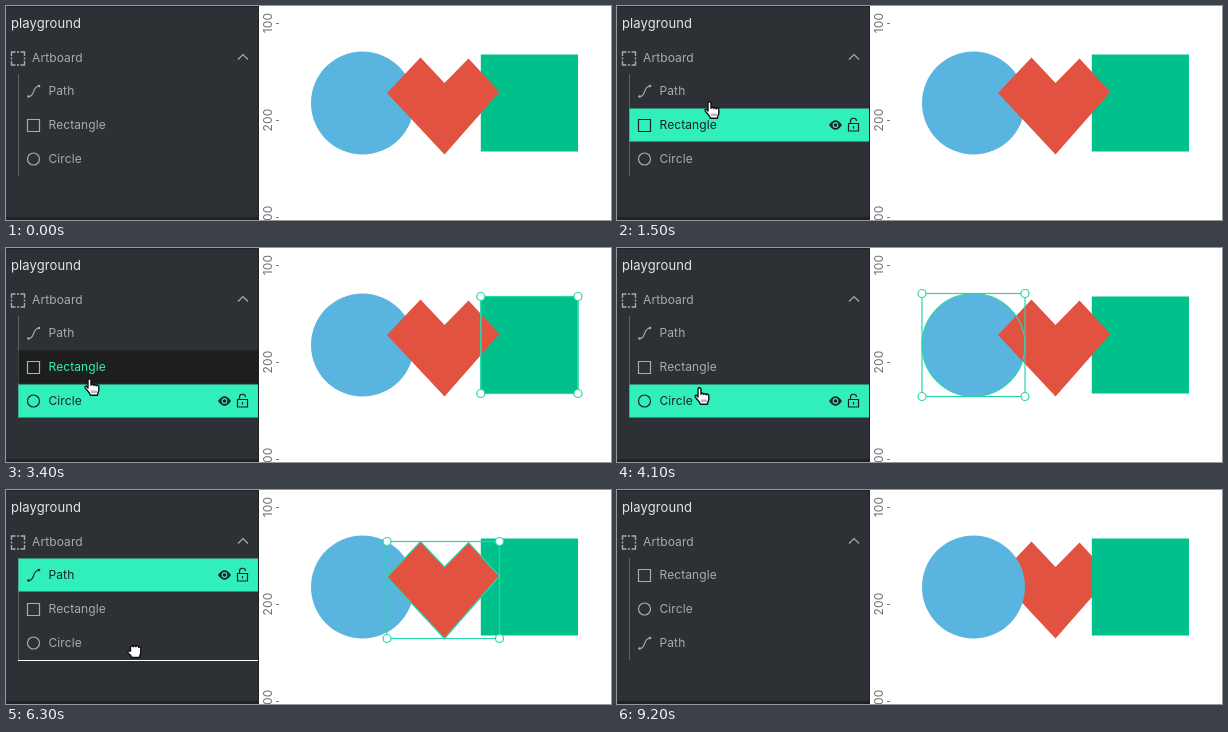
These frames come from a looping animation (605 px wide and 214 px high, 9400 ms). An HTML page with a canvas:

```html
<!DOCTYPE html>
<html lang="en">
<head>
<meta charset="utf-8">
<title>Layer list</title>
<style>
html, body { margin: 0; width: 100%; height: 100%; overflow: hidden; background: #fff; }
canvas { display: block; }
</style>
</head>
<body>
<canvas id="stage" width="605" height="214"></canvas>
<script>
const ctx = document.getElementById('stage').getContext('2d');
const LOOP = 9400, STEP = 100;
const FONT = 'Inter, "Open Sans", sans-serif';
const PANEL = '#2d3035', EDGE = '#1f2125', MUTED = '#a9abae';
const MINT = '#31efba', INK = '#1d2125', OUTLINE = '#2bd5aa';

const ENTER = 600, GRAB = 4900, DRAG = 5200, DROP = 6800, LEAVE = 9200;
const LIST_TOP = 68, ROW = 34, PANEL_W = 252;
const clicks = [2400, 3200, 3900, 4700, 7900];

// Eased cursor trips: start, end, left, top
const trips = [
  [600, 1000, 66, 158], [1000, 1300, 88, 97], [1400, 1900, 80, 79],
  [2600, 3000, 78, 112], [3200, 3600, 77, 148], [4000, 4300, 76, 114],
  [4400, 4700, 75, 87], [4800, 4900, 70, 86], [5100, 6600, 127, 162],
  [6700, 6800, 127, 164], [7500, 7900, 131, 172], [8500, 9100, 362, 2]
];

const sprites = {
  hand: new Path2D('M4 2.2a1.5 1.5 0 0 1 3 0V7.2a1.4 1.4 0 0 1 2.7.3a1.4 1.4 0 0 1 2.6.4a1.3 1.3 0 0 1 2.5.6V12c0 2-1.3 3-1.3 5.2H6.3C6 14.6 3.2 13 1.2 9.8C.6 8.6 2 7.8 3 8.8L4 10Z'),
  fist: new Path2D('M3.5 3.5a1.4 1.4 0 0 1 2.6-.8a1.5 1.5 0 0 1 2.8 0a1.4 1.4 0 0 1 2.7.7a1.3 1.3 0 0 1 2.2 1.1V8c0 2-1.2 3-1.2 5.5H5C4.6 11.5 2 10.5 1 8.5C.6 7 2 6.3 3.5 7.2Z'),
  arrow: new Path2D('M.5.5V15L4 11.8L6.2 16.8L8.6 15.8L6.4 11H11Z')
};

const shapes = {
  Circle: { box: [305, 45.5, 103, 103], color: '#59b5e0', path: new Path2D() },
  Rectangle: { box: [474.8, 48.5, 97.2, 97], color: '#00c18b', path: new Path2D() },
  Path: {
    box: [381, 51.5, 112.5, 97], color: '#e25241',
    path: new Path2D('M381 87L414.5 51.5L438.5 77L462.5 52.5L493.5 86L438.5 148.5Z')
  }
};
shapes.Circle.path.arc(356.5, 97, 51.5, 0, 7);
shapes.Rectangle.path.rect(...shapes.Rectangle.box);

const inside = (t, from, to) => t >= from && t < to;

function place(t) {
  let x = -5, y = 40;
  for (const [from, to, endX, endY] of trips) {
    const k = Math.min(1, Math.max(0, (t - from) / (to - from)));
    const ease = k * k * (3 - 2 * k);
    x += (endX - x) * ease;
    y += (endY - y) * ease;
  }
  return [x, y];
}

function rowOrder(t) {
  return t < DROP ? ['Path', 'Rectangle', 'Circle'] : ['Rectangle', 'Circle', 'Path'];
}

function hovered(t) {
  if (inside(t, GRAB, DROP)) return 'Path';
  const [x, y] = place(t), index = Math.floor((y + 8 - LIST_TOP) / ROW);
  if (!inside(t, ENTER, LEAVE) || x >= PANEL_W || y > 166) return '';
  return index === -1 ? 'Artboard' : rowOrder(t)[Math.min(index, 2)] || '';
}

// A click selects whatever lies under the cursor
function picked(t) {
  const last = clicks.filter(time => time <= t).pop();
  return last ? hovered(last) : '';
}

function fill(color, x, y, w, h) {
  ctx.fillStyle = color;
  ctx.fillRect(x, y, w, h);
}

function text(str, x, y, color, size = 12) {
  ctx.font = size + 'px ' + FONT;
  ctx.letterSpacing = '0.1px';
  ctx.fillStyle = color;
  ctx.fillText(str, x, y);
}

function stroke(d, color, width = 1.2) {
  ctx.strokeStyle = color;
  ctx.lineWidth = width;
  ctx.stroke(new Path2D(d));
}

function dot(x, y, r, color) {
  ctx.beginPath();
  ctx.arc(x, y, r, 0, 7);
  ctx.fillStyle = color;
  ctx.fill();
}

const icons = {
  Path(color) {
    stroke('M22.5 90.5C29.5 91 25.5 80.5 33 80', color);
    dot(22.5, 90.5, 1.3, color);
    dot(33, 80, 1.3, color);
  },
  Rectangle: color => stroke('M21.5 79.5h12v12h-12Z', color),
  Circle: color => stroke('M21.5 85a6 6 0 1 0 12 0a6 6 0 1 0-12 0Z', color)
};

function artboardIcon(color) {
  ctx.save();
  ctx.translate(12, 52.5);
  for (let i = 0; i < 4; i++) {
    stroke('M-6.5-2.5v-4h4M-1-6.5h2', color, 1.4);
    ctx.rotate(Math.PI / 2);
  }
  ctx.restore();
}

function rowTools() {
  ctx.fillStyle = INK;
  ctx.fill(new Path2D('M212 85Q218.5 75.5 225 85Q218.5 94.5 212 85Z'));
  dot(218.5, 85, 2.9, MINT);
  dot(218.5, 85, 1.8, INK);
  stroke('M231.5 83.5h10v7.5h-10ZM233.5 83.5V81.5a3 3 0 0 1 6-.5M236.5 86v2.5', INK);
}

function row(name, index, hover, pick) {
  const hot = name === hover, on = name === pick;
  const color = hot ? INK : on ? MINT : MUTED;
  ctx.save();
  ctx.translate(0, index * ROW);
  if (hot || on) fill(hot ? MINT : '#1e1e1e', 12.5, 68.5, PANEL_W - 12.5, 33);
  icons[name](color);
  text(name, 42.5, 89, color);
  if (hot) rowTools();
  ctx.restore();
}

function panel(t) {
  const hover = hovered(t), pick = picked(t);
  fill(PANEL, 0, 0, 253, 214);
  fill(EDGE, 0, 0, 253, 1);
  fill(EDGE, 0, 211, 253, 3);
  fill(EDGE, PANEL_W, 0, 1, 214);
  text('playground', 5, 22, '#e4e5e6', 13);

  const hot = hover === 'Artboard', color = hot ? INK : MUTED;
  if (hot) fill(MINT, 0, 36, PANEL_W, 31);
  artboardIcon(color);
  text('Artboard', 26, 56, color);
  stroke('M232 53.5L237 48.5L242 53.5', color);

  fill('#5d6064', 12, LIST_TOP, 1, 3 * ROW);
  rowOrder(t).forEach((name, i) => row(name, i, hover, pick));
  if (inside(t, DRAG, DROP)) {
    const slot = Math.floor((place(t)[1] - 52) / ROW);
    fill('#fff', 12, LIST_TOP + slot * ROW, PANEL_W - 12, 1);
  }
}

function ruler() {
  ctx.textAlign = 'center';
  for (let n = 1; n <= 3; n++) {
    const y = n * 97 - 80;
    ctx.save();
    ctx.translate(266, y);
    ctx.rotate(-Math.PI / 2);
    text(n * 100, 0, 0, '#707070');
    ctx.restore();
    fill('#808080', 270, y, 3, 1);
  }
  ctx.textAlign = 'left';
}

function selection({ path, box: [x, y, w, h] }) {
  ctx.strokeStyle = OUTLINE;
  ctx.lineWidth = 1.2;
  ctx.stroke(path);
  ctx.strokeRect(x, y, w, h);
  for (const px of [x, x + w]) {
    for (const py of [y, y + h]) {
      dot(px, py, 4, '#fff');
      ctx.stroke();
    }
  }
}

function cursor(t) {
  if (!inside(t, ENTER, LEAVE)) return;
  const name = inside(t, GRAB, DROP) ? 'fist' : hovered(t) ? 'hand' : 'arrow';
  ctx.save();
  ctx.translate(...place(t).map(Math.round));
  ctx.lineJoin = 'round';
  ctx.lineWidth = 1.4;
  ctx.strokeStyle = '#111';
  ctx.fillStyle = '#fff';
  ctx.fill(sprites[name]);
  ctx.stroke(sprites[name]);
  if (name === 'hand') stroke('M8 12.5v2.5M10 12.5v2.5M12 12.5v2.5', '#333', 0.7);
  ctx.restore();
}

function draw(t) {
  fill('#fff', 0, 0, 605, 214);
  ruler();
  for (const name of rowOrder(t).reverse()) {
    ctx.fillStyle = shapes[name].color;
    ctx.fill(shapes[name].path);
  }
  const pick = picked(t);
  if (pick) selection(shapes[pick]);
  panel(t);
  cursor(t);
}

const start = performance.now();
function frame() {
  const t = (performance.now() - start) % LOOP;
  draw(Math.floor(t / STEP) * STEP);
  requestAnimationFrame(frame);
}
frame();
</script>
</body>
</html>
```
